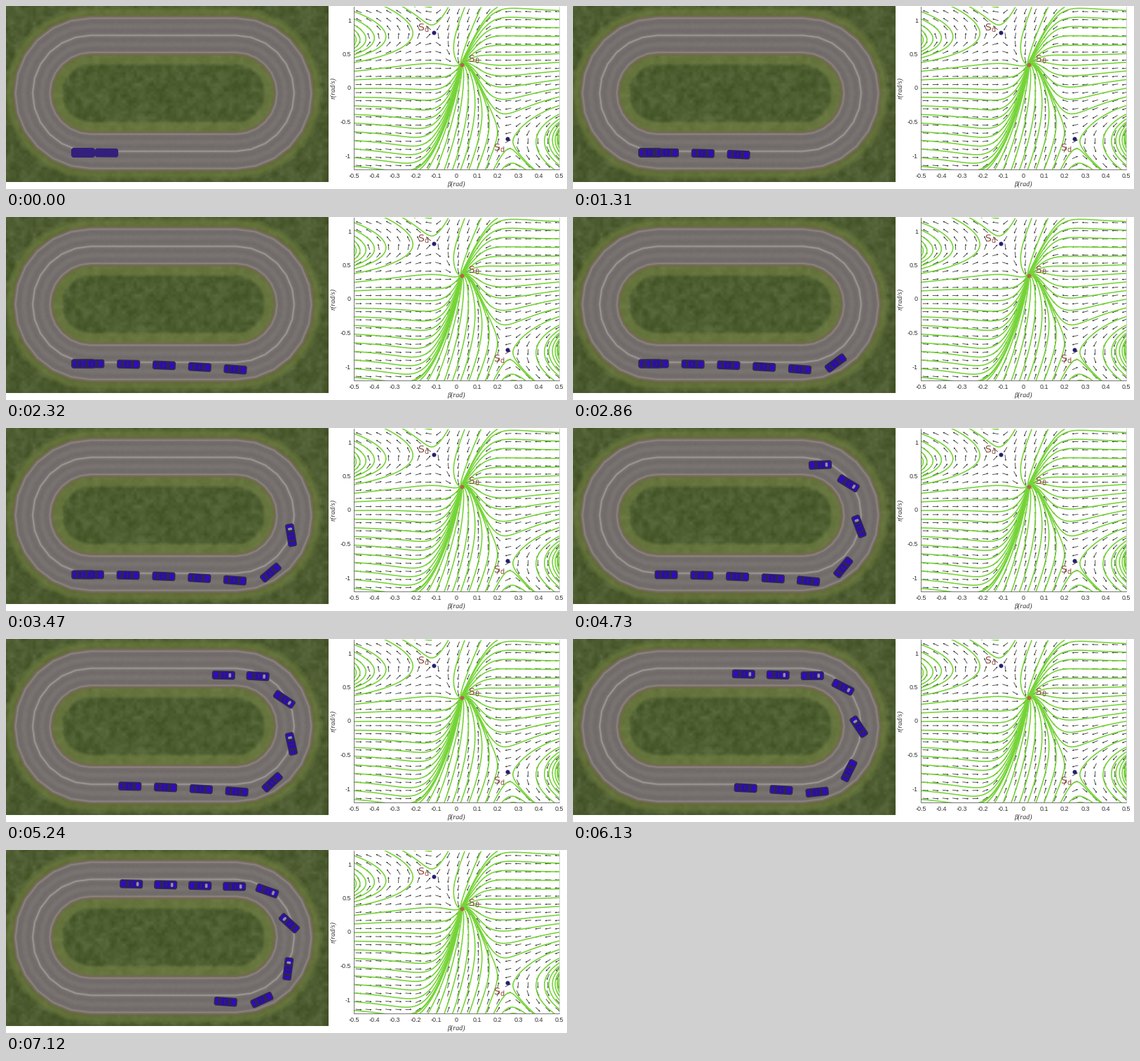
These frames come from a looping animation (800 px wide and 262 px high, 7.22 s). A matplotlib script:

```python
import numpy as np
import matplotlib.pyplot as plt
from matplotlib.animation import FuncAnimation
from matplotlib.collections import LineCollection, PolyCollection
from matplotlib.patches import Rectangle

W, H, DPI = 800, 262, 100
LOOP, FRAMES = 7220, 190
PX = 72 / DPI                      # one pixel in points
plt.rcParams["font.family"] = "Liberation Sans"

fig = plt.figure(figsize=(W / DPI, H / DPI), dpi=DPI, facecolor="white")
ax = fig.add_axes([0, 0, 1, 1])


# ---------- race track ----------
def noise(rng, w, h, step):
    """Smooth random texture in about -1..1 with the given grain."""
    gx, gy = np.arange(0, w + step, step), np.arange(0, h + step, step)
    grid = rng.uniform(-1, 1, (len(gy), len(gx)))
    rows = np.array([np.interp(np.arange(w), gx, row) for row in grid])
    return np.array([np.interp(np.arange(h), gy, col) for col in rows.T]).T


def track_image(w=460, h=252):
    rng = np.random.default_rng(4)
    y, x = np.mgrid[0:h, 0:w] + 0.5
    dx = x - np.clip(x, 121, 328)
    dy = y - 125
    seg = np.pi / 12               # the bends are made of short facets
    phi = np.arctan2(dy, dx) % seg - seg / 2
    radius = np.where(dx == 0, abs(dy),
                      np.hypot(dx, dy) * np.cos(phi) / np.cos(seg / 2))

    img = np.empty((h, w, 3))
    img[:] = (76, 91, 48)

    def band(lo, hi, color, soft=1.0, strength=1.0):
        a = np.clip((radius - lo) / soft + 0.5, 0, 1)
        a = a * np.clip((hi - radius) / soft + 0.5, 0, 1) * strength
        img[:] += a[..., None] * (np.array(color) - img)

    band(-9, 42, (77, 95, 49), 4)
    band(41, 56, (102, 116, 61), 5)
    band(110, 122, (99, 113, 58), 8)
    texture = 10 * noise(rng, w, h, 8) + 6 * noise(rng, w, h, 4)
    img += (texture * np.where((radius > 42) & (radius < 122), 0.5, 1))[..., None]
    band(54.5, 111.5, (120, 107, 86), 3)
    band(57.5, 109, (117, 111, 109), 2)
    lanes = 4 * np.cos((radius - 83) * 2 * np.pi / 13) + 1.5 * noise(rng, w, h, 3)
    img += np.where((radius > 58) & (radius < 108.5), lanes, 0)[..., None]
    for r, strength in ((58.5, 0.4), (83, 0.85), (107.5, 0.4)):
        band(r - 1, r + 1, (166, 161, 158), 2, strength)
    return np.clip(img, 0, 255).astype(np.uint8)


ax.imshow(track_image(), extent=(0, 460, 252, 0), interpolation="nearest",
          aspect="auto")
ax.set(xlim=(0, W), ylim=(H, 0))
ax.axis("off")

# ---------- phase portrait ----------
LEFT, RIGHT, TOP, BOTTOM = 496, 789, 1, 234
SCALE = np.array([293, -97])       # pixels per unit of slip angle and yaw rate
ORIGIN = np.array([642.5, 118])
box = Rectangle((LEFT, TOP), RIGHT - LEFT, BOTTOM - TOP, fc="none", ec="none")
ax.add_patch(box)


def flow(state):
    """Single-track vehicle with tyres that lose grip past their peak."""
    slip, yaw = state[..., 0], state[..., 1]
    front = -np.sin(1.56 * np.arctan(8.2 * (slip + 0.08 * yaw - 0.085)))
    rear = -np.sin(1.56 * np.arctan(10 * (slip - 0.14 * yaw)))
    return np.stack([0.845 * (0.636 * front + 0.364 * rear) - yaw,
                     6 * (front - rear)], axis=-1)


def trace(starts, steps=240, stride=3):
    """Follow the flow in screen space; strides shrink close to rest points."""
    pos = np.array(starts) * SCALE + ORIGIN

    def stride_at(p):
        v = flow((p - ORIGIN) / SCALE) * SCALE
        return stride * v / (np.linalg.norm(v, axis=1, keepdims=True) + 20)

    path = [pos]
    for _ in range(steps):
        pos = pos + stride_at(pos + stride_at(pos) / 2)
        path.append(pos)
    return np.stack(path, axis=1)


seeds = []
for edge in (-1, 1):
    inward = np.r_[np.linspace(-1.15, 0.38, 13), np.linspace(0.45, 0.68, 6)]
    seeds += [(0.5 * edge, -edge * yaw) for yaw in inward]
seeds += [(slip, -1.2) for slip in np.linspace(-0.22, 0.26, 13)]
seeds += [(slip, 1.2) for slip in np.linspace(-0.2, 0.2, 6)]
streams = LineCollection(trace(seeds), colors="#74d435", linewidths=1.6 * PX, zorder=3)
ax.add_collection(streams)
streams.set_clip_path(box)

gx, gy = np.meshgrid(np.arange(503, 789, 14.2), np.arange(8, 234, 11.6))
heading = flow((np.stack([gx, gy], axis=-1) - ORIGIN) / SCALE) * SCALE
heading *= 9 / (np.linalg.norm(heading, axis=-1, keepdims=True) + 1e-9)
arrows = ax.quiver(gx, gy, heading[..., 0], heading[..., 1], angles="xy",
                   scale_units="xy", scale=1, units="dots", width=0.8,
                   headwidth=3, headlength=3, headaxislength=3,
                   pivot="mid", color="#303030", zorder=2)
arrows.set_clip_path(box)

ax.plot([LEFT, LEFT, RIGHT], [TOP, BOTTOM, BOTTOM], color="#555555", lw=0.8 * PX, zorder=4)
ax.plot([RIGHT, RIGHT], [TOP, BOTTOM], color="#b0b0b0", lw=0.6 * PX, zorder=4)


def label(x, y, text, size, **kw):
    ax.text(x, y, text, fontsize=size * PX, **{"ha": "center", "va": "center", **kw})


for i in range(11):
    label(LEFT + i * 29.3, 243, f"{(i - 5) / 10:g}", 9, color="#333333")
for i in range(-2, 3):
    label(492, 118 - 48.5 * i, f"{i / 2:g}", 9, ha="right", color="#333333")
serif = dict(family="Liberation Serif", style="italic", color="#333333")
label(642, 255, "β(rad)", 10, **serif)
label(467, 117, "r(rad/s)", 10, rotation=90, **serif)

for x, y, color, tx, ty, sub in ((610, 38, "#25206e", 595, 32, "d"),
                                 (650, 84, "#b5654a", 667, 77, "0"),
                                 (715, 190, "#25206e", 703, 204, "d")):
    ax.plot(x, y, "o", ms=6 * PX, mfc=color, mec="none", zorder=5)
    label(tx, ty, rf"$\mathrm{{S}}_{{\mathrm{{{sub}}}}}$", 14, color="#8c4a3c", zorder=6)


# ---------- cars ----------
CARS = 9
BEND, EXIT = 4.44, 8.34            # where the bend starts and ends, in car gaps


def route(place):
    """Point on the driving line; place counts gaps between cars."""
    if place < BEND:
        return np.array([110 + 50.8 * place, 210 + 0.45 * place**2])
    if place > EXIT:
        return np.array([358 - 49 * (place - EXIT), 53 - 1.2 * (place - EXIT)])
    a = np.pi * (place - BEND) / (EXIT - BEND)
    return np.array([335 + 23 * a / np.pi + 61 * np.sin(a),
                     136 + 83 * np.cos(a) + 9 * np.sin(a)])


def plate(x0, x1, half, cut=0.0):
    return np.array([(x0, cut - half), (x0 + cut, -half), (x1 - cut, -half),
                     (x1, cut - half), (x1, half - cut), (x1 - cut, half),
                     (x0 + cut, half), (x0, half - cut)])


PARTS = [(plate(-16.5, 16.5, 6.3, 2), "#2c2a50"),
         (plate(-14.8, 14.8, 4.7, 2), "#3409bd"),
         (plate(-10.5, -6.5, 4.4, 0.8), "#29284a"),
         (plate(-5, 2.5, 4.4, 0.4), "#2d0ba4"),
         (plate(3.5, 8, 4.4, 0.8), "#29284a"),
         (plate(-2.2, 0, 3.2), "#2b2466")]
COLORS = [color for _, color in PARTS] + ["#8f90a6"]
DULL = "#33207c"

cars = PolyCollection([], closed=True, edgecolors="none", zorder=7)
ax.add_collection(cars)


def car_shapes(place):
    dx, dy = route(place + 0.1) - route(place - 0.1)
    drift = np.radians(32) * np.exp(-(place - 7) ** 2)
    a = np.arctan2(-dy, dx) + drift
    spin = np.array([(np.cos(a), -np.sin(a)), (np.sin(a), np.cos(a))])
    glint = plate(-1.8, 1.8, 3, 1) * (place > 5.9)
    glint = glint + (9 if place < 7.2 else -9, 0)
    return [shape @ spin + route(place) for shape in [p for p, _ in PARTS] + [glint]]


def update(i):
    t = (i + 0.5) * LOOP / FRAMES
    lead = np.interp(t, [190, 1310, 5240, 7020], [0.66, 2.48, 9.34, 12])
    verts = []
    for k in reversed(range(CARS)):
        verts += car_shapes(max(0, lead - k))
    cars.set_verts(verts)
    cars.set_facecolor([DULL] if t < 290 else COLORS * CARS)
    return [cars]


anim = FuncAnimation(fig, update, frames=FRAMES, interval=LOOP / FRAMES,
                     init_func=lambda: update(0), repeat=True, repeat_delay=0)
plt.show()
```
